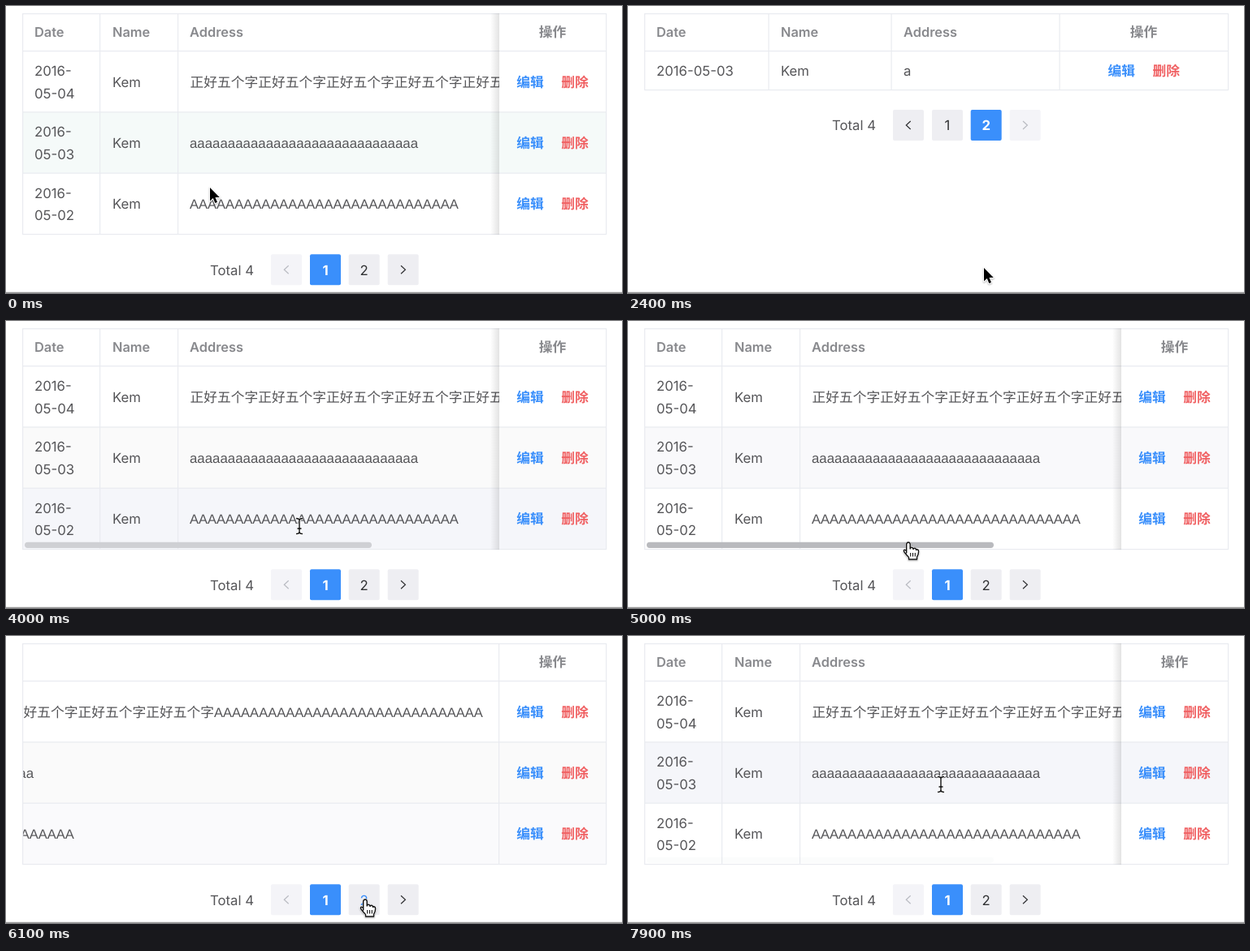
Write an HTML page with a canvas that moves like this. It is 758x354 px and loops after 8000 ms.

```html
<!DOCTYPE html>
<html lang="en">
<head>
<meta charset="utf-8">
<style>
html, body { margin: 0; width: 100%; height: 100%; overflow: hidden; background: #fff; }
canvas { display: block; }
</style>
</head>
<body>
<canvas id="stage" width="758" height="354"></canvas>
<script>
const ctx = document.getElementById('stage').getContext('2d');
const LOOP = 8000, STEP = 100, MAX_SCROLL = 473, THUMB_TRAVEL = 283;
const UI = 'Inter, "Noto Sans CJK SC", "Noto Sans CJK", sans-serif';
const BODY = '"Liberation Sans", "Noto Sans CJK SC", "Noto Sans CJK", sans-serif';
const INK = '#555558', HEAD = '#88898d', LINE = '#e9ebf0';
const BLUE = '#3a8ffb', RED = '#f06062', BUTTON = '#eeeef2', FAINT = '#f4f4f8';
const NAME = 'Kem';

// time, x, y, pointer shape
const POINTER = [
  [0, 251, 224, 'arrow'], [300, 352, 278, 'arrow'], [500, 410, 322, 'arrow'],
  [600, 424, 327, 'hand'], [700, 424, 327, 'hand'], [900, 439, 327, 'hand'],
  [1500, 439, 327, 'hand'], [1800, 438, 324, 'hand'],
  [2400, 438, 323, 'arrow'], [2700, 438, 323, 'arrow'], [3000, 405, 215, 'arrow'],
  [3200, 388, 146, 'hand'], [3500, 388, 146, 'hand'], [3600, 386, 155, 'beam'],
  [4000, 361, 253, 'beam'], [4300, 352, 277, 'hand'], [4600, 348, 305, 'arrow'],
  [4800, 345, 275, 'hand'], [5000, 345, 274, 'hand'], [5100, 510, 274, 'hand'],
  [5200, 704, 275, 'hand'], [5500, 705, 275, 'hand'], [5600, 650, 290, 'arrow'],
  [5900, 475, 329, 'hand'], [6100, 442, 326, 'hand'], [6200, 443, 325, 'hand'],
  [6800, 443, 325, 'arrow'], [6900, 443, 325, 'arrow'], [7200, 405, 215, 'arrow'],
  [7400, 387, 147, 'hand'], [7700, 387, 147, 'hand'], [7800, 386, 160, 'beam'],
  [7900, 385, 183, 'beam'], [8000, 385, 183, 'beam']
];

// time, second row, third row
const TINTS = [
  [0, '#f5faf9', '#fff'], [3500, '#fff', '#fff'], [3600, '#f5f7fa', '#fff'],
  [3900, '#fafafa', '#f5f6fa'], [4400, '#f9f9fb', '#fff'],
  [5200, '#fafafa', '#fafafc'], [7700, '#fff', '#fff'],
  [7800, '#f9fafc', '#fff'], [7900, '#f5f6fa', '#fff']
];

const clamp = (v, lo, hi) => Math.min(hi, Math.max(lo, v));
const latest = (keys, t) => keys.filter(k => k[0] <= t).pop();

function pointerAt(t) {
  const a = latest(POINTER, t), b = POINTER[POINTER.indexOf(a) + 1] || a;
  const p = b === a ? 0 : (t - a[0]) / (b[0] - a[0]);
  return { x: a[1] + (b[1] - a[1]) * p, y: a[2] + (b[2] - a[2]) * p, shape: a[3] };
}

function rect(x, y, w, h, color) {
  ctx.fillStyle = color;
  ctx.fillRect(x, y, w, h);
}

function pill(x, y, w, h, r, color) {
  ctx.fillStyle = color;
  ctx.beginPath();
  ctx.roundRect(x, y, w, h, r);
  ctx.fill();
}

function text(s, x, mid, { color = INK, weight = 400, size = 16.75, font = UI, align = 'left' } = {}) {
  ctx.font = `${weight} ${size}px ${font}`;
  ctx.textAlign = align;
  ctx.fillStyle = color;
  ctx.fillText(s, x, mid + 6.2);
}

const hLine = y => rect(20, y, 719, 1.2, LINE);
const vLine = (x, bottom) => rect(x, 9, 1.2, bottom - 9, LINE);
const heading = (s, x) => text(s, x, 32, { color: HEAD, weight: 600, size: 16.4 });

function actions(x, mid) {
  text('编辑', x, mid, { color: BLUE, weight: 700 });
  text('删除', x + 55, mid, { color: RED, weight: 700 });
}

function chevron(x, y, dir, color) {
  ctx.strokeStyle = color;
  ctx.lineWidth = 1.2;
  ctx.beginPath();
  ctx.moveTo(x - 2.7 * dir, y - 5);
  ctx.lineTo(x + 2.7 * dir, y);
  ctx.lineTo(x - 2.7 * dir, y + 5);
  ctx.stroke();
}

function pagination(page, top, pointer) {
  const mid = top + 19;
  text('Total 4', 251, mid);
  [326, 374, 421.7, 469.7].forEach((x, i) => {
    const active = i === page;
    const disabled = (i === 0 && page === 1) || (i === 3 && page === 2);
    const over = pointer.shape === 'hand' && pointer.x >= x && pointer.x <= x + 38 &&
      pointer.y >= top && pointer.y <= top + 38;
    pill(x, top, 38, 38, 2, active ? BLUE : disabled ? FAINT : BUTTON);
    if (i === 0 || i === 3) {
      chevron(x + 19, mid, i ? 1 : -1, disabled ? '#b9bbc2' : '#303133');
    } else {
      text(i, x + 19, mid, {
        color: active ? '#fff' : over ? BLUE : '#303133',
        weight: active ? 700 : 400, align: 'center'
      });
    }
  });
}

function scrollbar(t, scroll) {
  const fadeIn = t >= 7900 ? 0.08 : clamp((t - 3500) / 300, 0, 1);
  const fadeOut = t >= 7900 ? 1 : clamp((5900 - t) / 300, 0, 1);
  const alpha = fadeIn * fadeOut;
  if (!alpha) return;
  ctx.globalAlpha = alpha;
  pill(23 + THUMB_TRAVEL * scroll / MAX_SCROLL, 272.7, 427, 7.2, 3.6,
    t >= 4800 && t < 7900 ? '#b9babe' : '#cfd0d4');
  ctx.globalAlpha = 1;
}

function firstPage(t) {
  const drag = clamp(pointerAt(t).x - 345, 0, THUMB_TRAVEL);
  const scroll = t >= 5000 && t < 7700 ? (t < 5200 ? drag / THUMB_TRAVEL : 1) * MAX_SCROLL : 0;
  const tint = latest(TINTS, t);
  rect(21, 131, 717, 75, tint[1]);
  rect(21, 206, 717, 75, tint[2]);

  ctx.save();
  ctx.beginPath();
  ctx.rect(21, 9, 586, 273);
  ctx.clip();
  ctx.translate(-scroll, 0);
  vLine(115, 281);
  vLine(211, 281);
  heading('Date', 35);
  heading('Name', 131);
  heading('Address', 226);
  ['04', '03', '02'].forEach((day, i) => {
    const mid = 93.5 + 75.3 * i;
    text('2016-', 35, mid - 13.8);
    text('05-' + day, 35, mid + 13.8);
    text(NAME, 131, mid);
  });
  const capitals = { font: BODY, size: 16.55 };
  text('正好五个字'.repeat(6), 226.5, 93.5);
  text('A'.repeat(30), 729, 93.5, capitals);
  text('a'.repeat(30), 226, 168.8, { font: BODY, size: 16.85 });
  text('A'.repeat(30), 226, 244.1, capitals);
  ctx.restore();

  [9, 55, 130.3, 205.6, 281].forEach(hLine);
  if (scroll < MAX_SCROLL) {
    const shade = ctx.createLinearGradient(596, 0, 607, 0);
    shade.addColorStop(0, 'rgba(0,0,0,0)');
    shade.addColorStop(1, 'rgba(0,0,0,.11)');
    rect(596, 9, 11, 273, shade);
  } else {
    vLine(606, 281);
  }
  vLine(20, 282);
  vLine(738, 282);
  text('操作', 672.5, 32, { color: HEAD, weight: 700, align: 'center' });
  for (let i = 0; i < 3; i++) actions(628.3, 93.5 + 75.3 * i);
  scrollbar(t, scroll);
}

function secondPage() {
  [9, 55, 103].forEach(hLine);
  [20, 172.5, 323.5, 530.5, 738].forEach(x => vLine(x, 104));
  heading('Date', 35);
  heading('Name', 188);
  heading('Address', 339);
  text('操作', 634.5, 32, { color: HEAD, weight: 700, align: 'center' });
  text('2016-05-03', 35, 79.5);
  text(NAME, 188, 79.5);
  text('a', 339, 79.5);
  actions(590.5, 79.5);
}

const SHAPES = {
  arrow: new Path2D('M0 0V16.6L3.8 13L6.3 19L9 17.9L6.5 12.1H11.8Z'),
  beam: new Path2D('M-4 -9.5Q0 -9.5 0 -7Q0 -9.5 4 -9.5M0 -7V7M-4 9.5Q0 9.5 0 7Q0 9.5 4 9.5M-2.5 3H2.5'),
  hand: new Path2D('M-2.3 12V1.3Q-2 -1 0 -1Q2 -1 2.2 1.3V7Q2.5 5 4.2 5.2Q6 5.4 6 7.5' +
    'Q6.5 6 8 6.3Q9.6 6.6 9.6 8.5Q10.2 7.4 11.5 8Q12.7 8.6 12.6 10.5' +
    'Q12.6 14 10.6 17V20H0.5V17.5Q-2.5 14.5 -5 11Q-6.3 8.8 -4.8 8.2Q-3.5 8 -2.3 10Z'),
  creases: new Path2D('M2.7 12V16.5M5.5 12V16.5M8.3 12V16.5')
};

function drawPointer({ x, y, shape }) {
  const path = SHAPES[shape];
  ctx.save();
  ctx.translate(x, y);
  ctx.lineJoin = 'round';
  const stroke = (p, color, width) => {
    ctx.strokeStyle = color;
    ctx.lineWidth = width;
    ctx.stroke(p);
  };
  if (shape === 'beam') {
    stroke(path, '#fff', 3);
    stroke(path, '#111', 1.4);
  } else {
    ctx.shadowColor = 'rgba(0,0,0,.3)';
    ctx.shadowBlur = 2;
    ctx.shadowOffsetY = 1;
    stroke(path, '#fff', 2.2);
    ctx.shadowColor = 'transparent';
    ctx.fillStyle = shape === 'hand' ? '#fff' : '#000';
    ctx.fill(path);
    if (shape === 'hand') {
      stroke(path, '#111', 1.4);
      stroke(SHAPES.creases, '#111', 1.1);
    }
  }
  ctx.restore();
}

function draw(now) {
  const t = Math.floor((now % LOOP) / STEP) * STEP;
  const pointer = pointerAt(t);
  const second = (t >= 2400 && t < 3500) || (t >= 6800 && t < 7700);
  ctx.textRendering = 'geometricPrecision';
  rect(0, 0, 758, 354, '#fff');
  if (second) secondPage();
  else firstPage(t);
  pagination(second ? 2 : 1, second ? 128 : 306.3, pointer);
  rect(0, 352.8, 758, 1.2, '#9b9b9b');
  drawPointer(pointer);
}

let start;
function tick(now) {
  start ??= now;
  draw(Math.max(0, now - start));
  requestAnimationFrame(tick);
}
draw(0);
requestAnimationFrame(tick);
</script>
</body>
</html>
```
